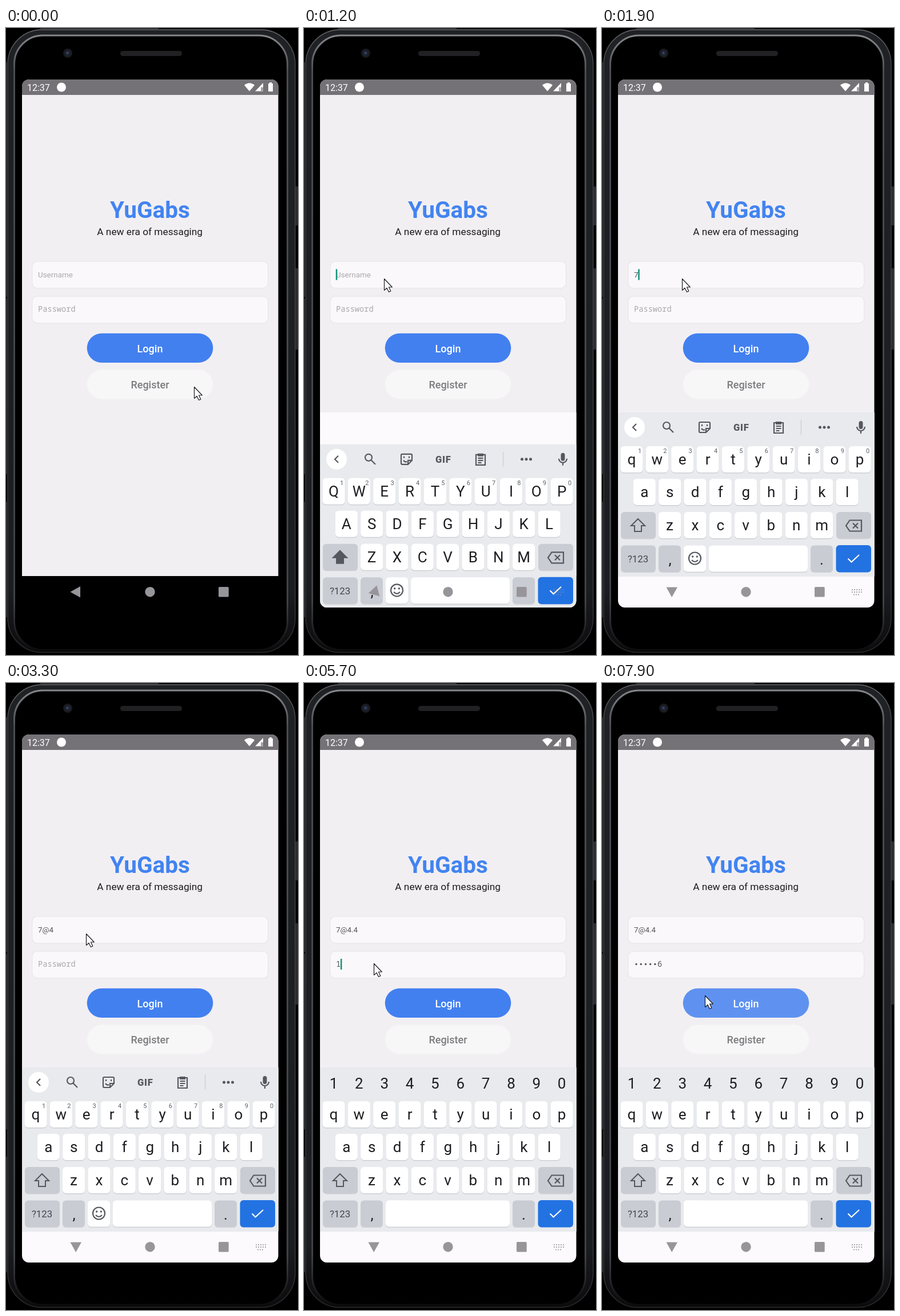
Recreate the animation shown at these times as an HTML page. Size 511 by 1096 pixels, loop 8 s.

```html
<!DOCTYPE html>
<html lang="en">
<head>
<meta charset="utf-8">
<title>Login screen</title>
<style>
  html, body { margin: 0; width: 100%; height: 100%; overflow: hidden; background: #000; }
  svg { display: block; width: 100%; height: 100%; }
  text { font-family: Roboto, "Open Sans", sans-serif; white-space: pre; }
  .mid { text-anchor: middle; }
  .key { font-size: 26px; fill: #1d1d20; text-anchor: middle; }
  .hint { font-size: 11px; fill: #5c5e64; text-anchor: middle; }
  .line { fill: none; stroke: #55585e; stroke-width: 2.2; }
  .field { font-size: 13.4px; }
  .mono { font-family: "Noto Sans Mono", "DejaVu Sans Mono", monospace; font-size: 13.7px; }
</style>
</head>
<body>
<svg viewBox="0 0 511 1096" xmlns="http://www.w3.org/2000/svg">
  <defs>
    <linearGradient id="rim" x2="0" y2="1">
      <stop offset="0" stop-color="#202124"/><stop offset=".9" stop-color="#1c1d20"/>
      <stop offset="1" stop-color="#0b0b0c"/>
    </linearGradient>
    <linearGradient id="edge" x2="0" y2="1">
      <stop offset="0" stop-color="#6a6b70"/><stop offset=".06" stop-color="#424348"/>
      <stop offset=".92" stop-color="#38393d"/><stop offset="1" stop-color="#2a2b2e"/>
    </linearGradient>
    <linearGradient id="glint" x2="0" y2="1">
      <stop offset="0" stop-color="#85868b"/><stop offset=".06" stop-color="#4a4b50"/>
      <stop offset=".92" stop-color="#404146"/><stop offset="1" stop-color="#0c0c0d"/>
    </linearGradient>
    <clipPath id="panel"><path d="M28 672H476.500V1001a12 12 0 0 1-12 12H40a12 12 0 0 1-12-12Z"/></clipPath>
  </defs>

  <g id="phone">
    <rect width="511" height="1096"/>
    <path d="M.7 60V470M.7 473V780M.7 828V1030M60 .7H267" stroke="#3a3b3f" stroke-width="1.400"/>
    <path d="M505 277h6v68h-6zM505 420h6v142h-6z" fill="#2b2c2f"/>
    <rect x="3" y="3" width="503" height="1088.500" rx="60" fill="url(#rim)" stroke="url(#edge)" stroke-width="1.500"/>
    <rect x="14.500" y="13" width="478" height="1074" rx="50" stroke="url(#glint)" stroke-width="3"/>
    <circle cx="108" cy="44" r="8" fill="#1a1b1f"/>
    <circle cx="108" cy="44" r="4.500" fill="#20263a"/>
    <circle cx="107.500" cy="43.500" r="1.800" fill="#3c4a74"/>
    <rect x="200" y="40" width="108" height="9" rx="4.500" fill="#212124"/>
  </g>

  <g id="app">
    <path d="M28 958V102a12 12 0 0 1 12-12H464.500a12 12 0 0 1 12 12V958Z" fill="#f2eff3"/>
    <path d="M28 117V102a12 12 0 0 1 12-12H464.500a12 12 0 0 1 12 12V117Z" fill="#757277"/>
    <g fill="#fff">
      <text x="37" y="110" font-size="16">12:37</text>
      <circle cx="97" cy="103.500" r="8"/>
      <path d="M417 100Q426 92.500 435 100L426 110.500Z"/>
      <path d="M450 96V110.500H436Z"/>
      <path d="M459 97h2v-2h4v2h2v14h-8z"/>
    </g>
    <path d="M446 103.500h4v7h-4z" fill="#a5a3a7"/>
    <text class="mid" x="252" y="332" font-size="40.500" font-weight="700" fill="#4284f0">YuGabs</text>
    <text class="mid" x="251.700" y="361.500" font-size="17.300" fill="#1d1c1f">A new era of messaging</text>
    <g fill="#faf8fb" stroke="#ebe8ec" stroke-width="1.500">
      <rect x="45.700" y="408" width="413" height="47" rx="9"/>
      <rect x="45.700" y="469" width="413" height="47" rx="9"/>
    </g>
    <text id="user" class="field" x="56" y="436"></text>
    <text id="pass" class="mono" y="496"></text>
    <g id="dots" fill="#555357"></g>
    <rect id="caret" width="2.500" height="19" fill="#14927a"/>
    <g font-size="18" font-weight="500">
      <rect id="login" x="141.700" y="533.700" width="220.600" height="51.300" rx="25.600" fill="#4280f0"/>
      <text class="mid" x="252" y="567" fill="#fff">Login</text>
      <rect x="142" y="597.500" width="220" height="51" rx="25.500" fill="#f7f7f7"/>
      <text class="mid" x="252" y="630" fill="#7d7b7f">Register</text>
    </g>
  </g>

  <g id="ime" clip-path="url(#panel)">
    <rect x="28" y="672" width="449" height="342" fill="#fcfafd"/>
    <g id="board">
      <rect x="28" y="672" width="449" height="287" fill="#e8eaed"/>
      <g id="keys"></g>
      <g id="tools">
        <circle cx="57" cy="698" r="18" fill="#fff"/>
        <path class="line" d="M60 692l-6 6 6 6"/>
        <circle class="line" cx="113" cy="695" r="6"/>
        <path class="line" d="M117.500 699.500l7.500 7.500"/>
        <path class="line" d="M172 689h15a2 2 0 0 1 2 2v9l-7 7h-10a2 2 0 0 1-2-2v-14a2 2 0 0 1 2-2zM189 700h-7v7M174 700q3 4 6 2M175 693v3M184 693v3"/>
        <text class="mid" x="243.800" y="704" font-size="16.500" font-weight="900" letter-spacing=".8" fill="#55585e">GIF</text>
        <path class="line" d="M301 690h16v18h-16zM304.500 696h9M304.500 700h9M304.500 704h6"/>
        <path d="M304 688h10v5h-10z" fill="#55585e"/>
        <path d="M348.500 685v26" stroke="#cfd1d5" stroke-width="1.500"/>
        <g fill="#55585e"><circle cx="381.500" cy="698" r="2.500"/><circle cx="389" cy="698" r="2.500"/><circle cx="396.500" cy="698" r="2.500"/>
          <rect x="449.500" y="687" width="7" height="14" rx="3.500"/></g>
        <path class="line" d="M446 697a7 7 0 0 0 14 0M453 704v5"/>
      </g>
      <g id="smile">
        <circle class="line" cx="162.500" cy="927" r="10.500"/>
        <path class="line" d="M157 930q5.500 6 11 0"/>
        <circle cx="158.700" cy="924" r="1.700" fill="#55585e"/><circle cx="166.300" cy="924" r="1.700" fill="#55585e"/>
      </g>
      <path id="shift" d="M63 858L75 870H69V880H57V870H51Z" stroke="#55585e" stroke-width="2"/>
      <path class="line" d="M433.500 860.500h20.500v19h-20.500l-6.500-9.500zM439 865.500l9 9m0-9l-9 9"/>
      <path d="M430.500 927.500l6 6 13.500-12.500" fill="none" stroke="#fff" stroke-width="2.200"/>
    </g>
  </g>

  <g id="nav" fill="#98959a">
    <path id="back" d="M112.500 985.700L130 976V995.500Z"/>
    <circle cx="252" cy="985.700" r="8.700"/>
    <rect x="372" y="977" width="17.700" height="17.500" rx="1.500"/>
    <path id="switch" d="M437 982h18M437 986h18M440 990.500h12" stroke="#a9a6ab" stroke-width="2" stroke-dasharray="2 2"/>
  </g>
  <path id="mouse" d="M.5 .5V20.500L5 16.500L8.500 23.500L11.800 22L8.500 15H14.300Z" fill="#fff" stroke="#1c1c1f" stroke-width="1.200" stroke-linejoin="round"/>
</svg>

<script>
const LOOP = 8000, STEP = 100, PITCH = 44.35, CELL = 8.2;
const $ = id => document.getElementById(id);
const show = (id, on) => $(id).style.display = on ? '' : 'none';
const clamp = v => Math.min(1, Math.max(0, v));
const span = (t, a, b) => clamp((t - a) / (b - a));
const smooth = k => k * k * (3 - 2 * k);

const GREY = '#c9ccd3', BLUE = '#2372e2';

function keyBox(x, y, w, fill = '#fff', id = '') {
  const shape = (dy, color, name) =>
    `<rect ${name} x="${x}" y="${y + dy}" width="${w}" height="46" rx="6" fill="${color}"/>`;
  return shape(1.5, '#cdd0d5', id && `id="${id}Shade"`) + shape(0, fill, id && `id="${id}"`);
}

function buildKeys() {
  let out = '', hints = '', digits = '';
  const rows = [['qwertyuiop', 52, 731], ['asdfghjkl', 74.3, 788], ['zxcvbnm', 118.5, 846]];
  for (const [letters, left, y] of rows)
    [...letters].forEach((c, i) => {
      const x = left + i * PITCH;
      out += keyBox(x - 19.5, y, 39) + `<text class="key letter" x="${x}" y="${y + 32}">${c}</text>`;
    });
  for (let i = 0; i < 10; i++) {
    const x = 52 + i * PITCH, d = (i + 1) % 10;
    hints += `<text class="hint" x="${x + 14}" y="743">${d}</text>`;
    digits += `<text class="key" x="${x}" y="709">${d}</text>`;
  }
  out += keyBox(33, 846, 61, GREY) + keyBox(410, 846, 61, GREY) +
    keyBox(33, 904.5, 61, GREY) + keyBox(99, 904.5, 39, GREY) +
    keyBox(143, 904.5, 39) + keyBox(187, 904.5, 173, '#fff', 'space') +
    keyBox(365, 904.5, 39, GREY) +
    `<rect x="409.500" y="904" width="61.500" height="47.500" rx="6" fill="${BLUE}"/>` +
    '<text class="mid" x="63" y="934" font-size="16.800" fill="#44464b">?123</text>' +
    '<text class="key" x="119" y="938">,</text><text class="key" x="384.500" y="938">.</text>' +
    `<g id="hints">${hints}</g><g id="digits">${digits}</g>`;
  $('keys').innerHTML = out;
}

// Key press times for each field, after the time it gains focus.
const user = { focus: 1000, text: '7@4.4', keys: [1900, 2400, 2800, 3600, 3900] };
const pass = { focus: 5200, text: '123456', keys: [5700, 5800, 5900, 6100, 6800, 7000] };

const typed = (field, t) => field.keys.filter(k => k <= t).length;
function caretOn(field, t) {
  const last = [field.focus, ...field.keys].filter(k => k <= t).pop();
  return (t - last) % 1000 < 500;
}

const moves = [
  [0, 600, [329, 320, 139, 140], [627, 360, 190, 438]],
  [4400, 5000, [140, 134, 128, 122], [438, 455, 473, 490]],
  [7000, 7500, [122, 141, 161, 180], [490, 509, 527, 546]]
];
const bezier = ([a, b, c, d], k, m = 1 - k) => a * m ** 3 + 3 * b * k * m * m + 3 * c * k * k * m + d * k ** 3;

function drawFields(t) {
  const n = typed(user, t), m = typed(pass, t);
  const name = $('user'), word = $('pass');
  name.textContent = n ? user.text.slice(0, n) : 'Username';
  name.setAttribute('fill', n ? '#555357' : '#aaa8ac');
  word.textContent = m ? pass.text[m - 1] : 'Password';
  word.setAttribute('fill', m ? '#555357' : '#aaa8ac');
  word.setAttribute('x', 56 + CELL * Math.max(0, m - 1));
  let dots = '';
  for (let i = 0; i < m - 1; i++) dots += `<circle cx="${60 + CELL * i}" cy="491.500" r="1.700"/>`;
  $('dots').innerHTML = dots;

  const inPass = t >= pass.focus;
  const x = inPass ? 55.7 + CELL * m : 55.7 + (n ? name.getComputedTextLength() : 0);
  $('caret').setAttribute('x', x);
  $('caret').setAttribute('y', inPass ? 482 : 421.5);
  show('caret', t >= user.focus && caretOn(inPass ? pass : user, t));
}

function drawKeyboard(t) {
  const open = span(t, 1000, 1500), upper = t < 1900, numeric = t >= 5300;
  show('ime', open > 0);
  show('switch', open > 0);
  $('switch').style.opacity = open;
  $('board').setAttribute('transform', `translate(0 ${286 * (1 - open) ** 3.2})`);
  $('back').setAttribute('transform', `rotate(${-90 * open * open} 122 985.5)`);
  document.querySelectorAll('.letter').forEach(e =>
    e.textContent = upper ? e.textContent.toUpperCase() : e.textContent.toLowerCase());
  $('shift').setAttribute('fill', upper ? '#55585e' : 'none');
  for (const id of ['tools', 'hints', 'smile']) show(id, !numeric);
  show('digits', numeric);
  for (const id of ['space', 'spaceShade']) {
    $(id).setAttribute('x', numeric ? 143 : 187);
    $(id).setAttribute('width', numeric ? 217 : 173);
  }
}

function render(t) {
  drawFields(t);
  drawKeyboard(t);
  const [a, b, xs, ys] = moves.filter(m => m[0] <= t).pop();
  const k = smooth(span(t, a, b));
  $('mouse').setAttribute('transform', `translate(${bezier(xs, k)} ${bezier(ys, k)})`);
  $('login').style.opacity = 1 - 0.17 * span(t, 7600, 7900);
}

buildKeys();
const start = performance.now();
function tick() {
  const t = (performance.now() - start) % LOOP;
  render(Math.floor(t / STEP) * STEP);
  requestAnimationFrame(tick);
}
tick();
</script>
</body>
</html>
```
